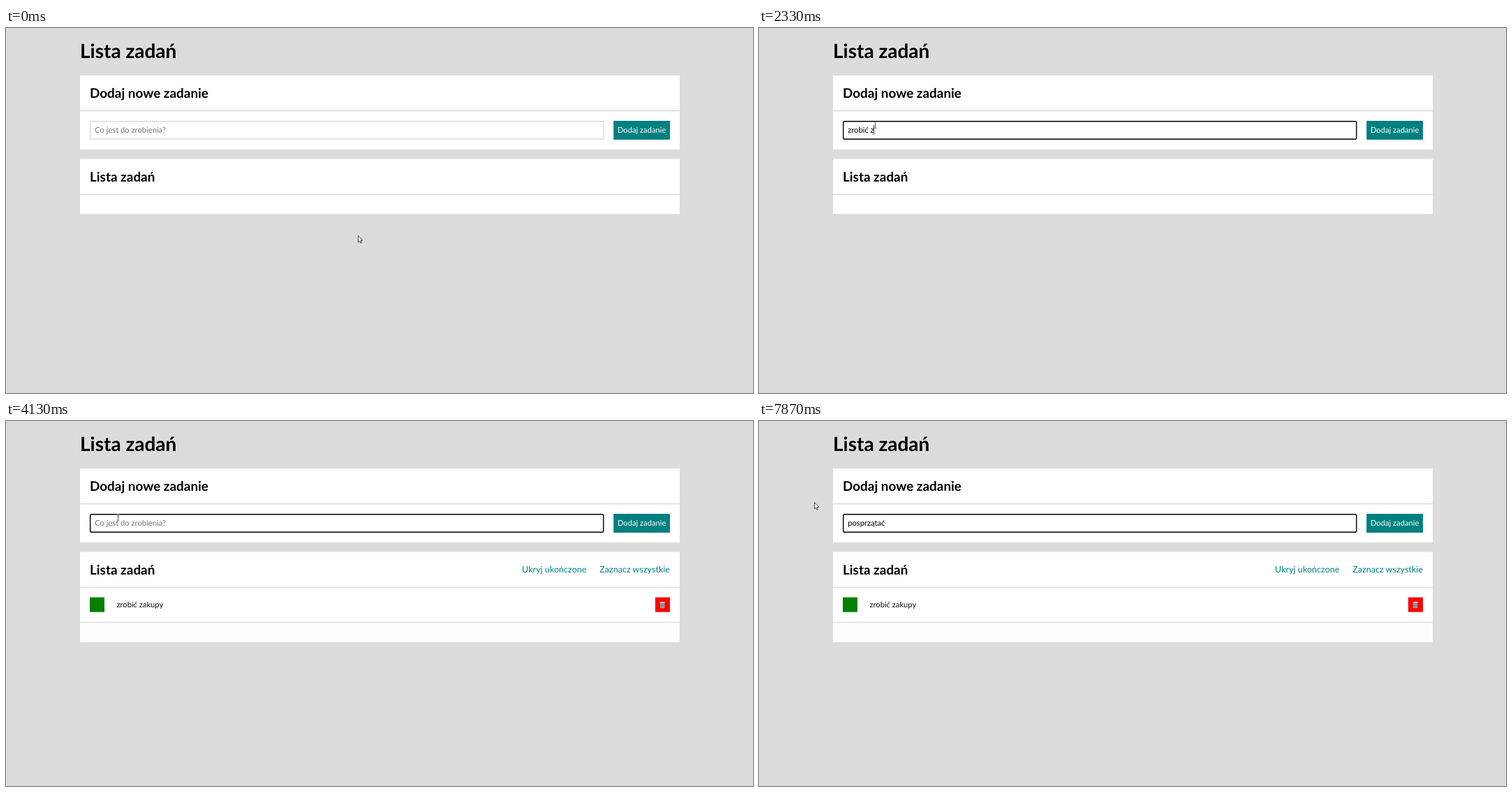
An HTML page with a canvas for the animation above (8000 ms loop, 1070x523 px).

```html
<!DOCTYPE html>
<html lang="pl">
<head>
<meta charset="utf-8">
<title>Lista zadań</title>
<style>
  html, body { margin: 0; width: 100%; height: 100%; overflow: hidden; background: #dcdcdc; }
  canvas { display: block; }
</style>
</head>
<body>
<canvas id="stage" width="1070" height="523"></canvas>
<script>
const ctx = document.getElementById('stage').getContext('2d');
const LOOP = 8000, BLINK = 530;
const FOCUS = 660, ADDED = 4120;
const GREY = '#dcdcdc', TEAL = '#008080';

// The page is shown at 70 %.
const ZOOM = 0.7;
const BODY = 16 * ZOOM, LINK = 18 * ZOOM, H2 = 27 * ZOOM, H1 = 40 * ZOOM;
const PAD = 20 * ZOOM, BORDER = 2 * ZOOM, ICON = 30 * ZOOM;
const LEFT = 106, WIDTH = 859, RIGHT = LEFT + WIDTH, HEADER = 50;
const TEXT_X = 127.2, FIELD_Y = 133, FIELD_H = 27;

// Words are typed at an even pace.
const entries = [
  { text: 'zrobić zakupy', from: 1005, to: 3255 },
  { text: 'posprzątać', from: 5275, to: 7325 }
];

const home = { x: 504, y: 297 };
const moves = [
  { from: 60, to: 600, x: 166, y: 139 },
  { from: 3900, to: 4000, x: 160, y: 138 },
  { from: 4160, to: 4580, x: 3, y: 107 },
  { from: 4580, to: 4860, x: 79, y: 116 }
];
const arrow = new Path2D('M.5 .5V10l2.1-1.9 1.4 3.2 1.4-.6L4 7.6l2.8-.2z');

const clamp = v => Math.min(1, Math.max(0, v));
const easeOut = k => 1 - (1 - k) ** 3;

function pointerAt(t) {
  return moves.reduce((p, m) => {
    const k = easeOut(clamp((t - m.from) / (m.to - m.from)));
    return { x: p.x + (m.x - p.x) * k, y: p.y + (m.y - p.y) * k };
  }, home);
}

// Number of letters typed, and the moment of the latest one.
function typing({ text, from, to }, t) {
  if (t < from) return { count: 0, last: FOCUS };
  const step = (to - from) / (text.length - 1);
  const count = Math.min(text.length, 1 + Math.floor((t - from) / step));
  return { count, last: from + (count - 1) * step };
}

function box(x, y, w, h, color) {
  ctx.fillStyle = color;
  ctx.fillRect(x, y, w, h);
}

function label(text, x, y, size, { color = '#000', weight = 400, align = 'left' } = {}) {
  ctx.font = `${weight} ${size}px Lato, sans-serif`;
  ctx.fillStyle = color;
  ctx.textAlign = align;
  ctx.fillText(text, x, y);
}

function panel(y, h, title) {
  box(LEFT, y, WIDTH, h, '#fff');
  box(LEFT, y + HEADER, WIDTH, BORDER, GREY);
  label(title, LEFT + PAD, y + 31.8, H2, { weight: 700 });
}

function drawField(t) {
  const focused = t >= FOCUS;
  ctx.lineWidth = BORDER;
  ctx.strokeStyle = focused ? '#000' : GREY;
  ctx.beginPath();
  ctx.roundRect(LEFT + PAD + BORDER / 2, FIELD_Y + BORDER / 2,
    736.5 - BORDER, FIELD_H - BORDER, focused ? 1.8 : 0);
  ctx.stroke();

  const entry = entries[t < ADDED ? 0 : 1];
  const { count } = typing(entry, t);
  const typed = entry.text.slice(0, count);
  const baseline = FIELD_Y + 17.3;
  if (typed) label(typed, TEXT_X, baseline, BODY);
  else label('Co jest do zrobienia?', TEXT_X, baseline, BODY, { color: '#757575' });

  const last = Math.max(...entries.map(e => typing(e, t).last));
  if (focused && Math.floor((t - last) / BLINK) % 2 === 0) {
    const x = TEXT_X + ctx.measureText(typed).width;
    box(Math.floor(x), FIELD_Y + 6.4, 1, 13.4, '#333');
  }
}

function drawTrash(x, y) {
  box(x, y, ICON, ICON, '#f00');
  box(x + 7, y + 6.5, 6.4, 9, '#a3aaa4');
  box(x + 6.7, y + 6.3, 7, 1.6, '#d0d6d2');
  for (let i = 0; i < 3; i++) box(x + 8 + i * 1.8, y + 8.5, 0.7, 6, '#69736d');
}

function drawTask() {
  const y = 252.7, rowEnd = 287.8;
  box(LEFT, rowEnd, WIDTH, 29.2, '#fdfdfd');
  box(LEFT, rowEnd, WIDTH, BORDER, GREY);
  label('Ukryj ukończone', 831.5, 216.6, LINK, { color: TEAL, align: 'right' });
  label('Zaznacz wszystkie', RIGHT - PAD, 216.6, LINK, { color: TEAL, align: 'right' });
  box(LEFT + PAD, y, ICON, ICON, '#008000');
  label(entries[0].text, 158.4, y + 14.6, BODY, { color: '#111' });
  drawTrash(RIGHT - PAD - ICON, y);
}

function drawPointer({ x, y }) {
  const overField = x > 120 && x < 857 && y > FIELD_Y && y < FIELD_Y + FIELD_H;
  if (overField) {
    box(x, y - 4.5, 1, 9.5, '#555');
    for (const edge of [-5, 4.5]) box(x - 1.5, y + edge, 4, 0.8, '#777');
    return;
  }
  ctx.save();
  ctx.translate(x, y);
  ctx.fillStyle = '#fff';
  ctx.fill(arrow);
  ctx.lineWidth = 0.9;
  ctx.strokeStyle = '#333';
  ctx.stroke(arrow);
  ctx.restore();
}

function draw(t) {
  box(0, 0, 1070, 523, GREY);
  label('Lista zadań', LEFT, 43.3, H1, { weight: 700 });
  panel(68, 106, 'Dodaj nowe zadanie');
  drawField(t);
  box(870.2, FIELD_Y, 80.8, FIELD_H, TEAL);
  label('Dodaj zadanie', 910.6, FIELD_Y + 17.3, BODY, { color: '#fff', align: 'center' });

  panel(187.7, t < ADDED ? 78.8 : 129.3, 'Lista zadań');
  if (t >= ADDED) drawTask();
  drawPointer(pointerAt(t));
}

ctx.textRendering = 'geometricPrecision';
const start = performance.now();
function tick() {
  draw((performance.now() - start) % LOOP);
  requestAnimationFrame(tick);
}
tick();
</script>
</body>
</html>
```
